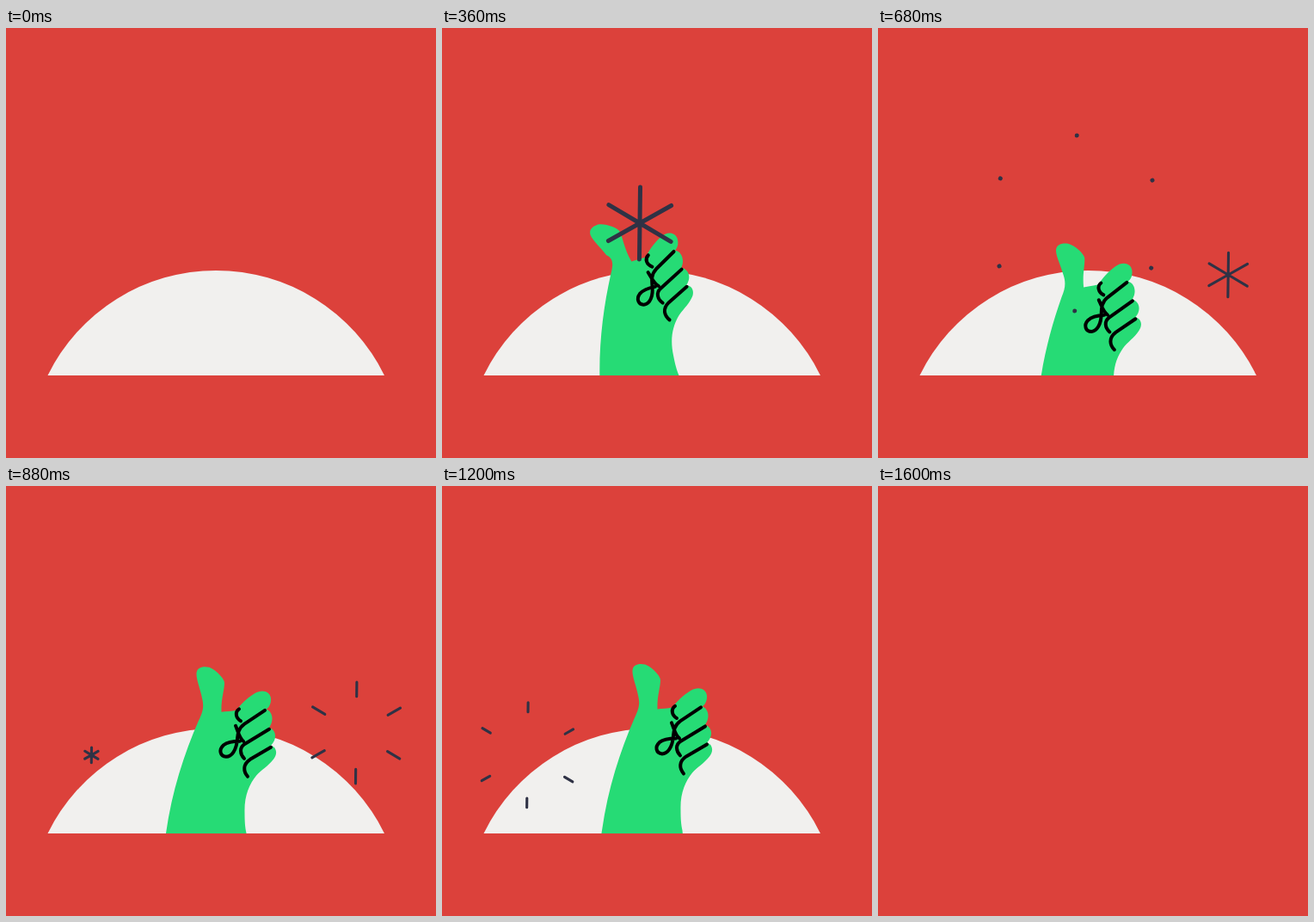
Recreate the animation shown at these times as an HTML page. Size 500x500 px, loop 1960 ms.

```html
<!DOCTYPE html>
<html lang="en">
<head>
<meta charset="utf-8">
<title>Thumbs up</title>
<style>
  html, body { margin: 0; width: 100%; height: 100%; overflow: hidden; background: #dc413b; }
  svg { display: block; width: 100vw; height: 100vh; }
  #lines { fill: none; stroke: #000; stroke-width: 4; stroke-linecap: round; stroke-linejoin: round; }
  .burst { fill: none; stroke: #2f3245; stroke-width: 5; stroke-linecap: round; }
</style>
</head>
<body>
<svg viewBox="0 0 500 500">
  <defs><clipPath id="floor"><path d="M0 0H500V404H0Z"/></clipPath></defs>
  <g id="scene">
    <path fill="#f1f0ee" d="M48.5 404A218 218 0 0 1 440 404Z"/>
    <g clip-path="url(#floor)">
      <g id="hand">
        <path id="skin" fill="#26db75"/>
        <path id="lines" d="M271 259.500C266 263 267 270 273 273.500
          M301 261L277 277C270 282 269.500 289 269 294C268 308 262 315 256 315C249 314.500 247 307 253 301.500C258 297.500 265 297 272 297
          M267 279C270 286 271 293 276 297
          M306 283L278 300C271 304 272 312 277 317
          M308 304L284 318C275 324 276 332 281 338"/>
      </g>
    </g>
    <g id="bursts"></g>
  </g>
</svg>
<script>
const LOOP = 1960, STEP = 40, END = 1600;
const $ = id => document.getElementById(id);
const clamp = v => Math.min(1, Math.max(0, v));
const ease = (t, a, b) => { const p = clamp((t - a) / (b - a)); return p * p * (3 - 2 * p); };

// time, drop, tilt, thumb bend
const poses = [
  [40, 210, -11, -15],
  [360, 0, -11, -15],
  [660, 37, -4.2, 0],
  [860, 0, 0, 0]
];

const bursts = [
  { x: 230, y: 227, r: 102, at: 0 },
  { x: 407.2, y: 287, r: 60, at: 315 },
  { x: 99.4, y: 312.8, r: 61, at: 606 }
];
for (const b of bursts) {
  b.el = document.createElementNS('http://www.w3.org/2000/svg', 'path');
  b.el.setAttribute('class', 'burst');
  b.el.setAttribute('transform', `translate(${b.x} ${b.y}) rotate(.7)`);
  b.el.style.strokeWidth = b.r > 100 ? 5 : 3.1;
  $('bursts').append(b.el);
}

const thumb = [
  [228, 247], [226, 236], [221, 225], [221.5, 218],
  [222, 211], [229, 209.5], [236, 211],
  [243, 213], [254, 224], [254, 229], [254, 238], [250, 247]
];
const arm = 'M177 480C180 455 183 422 186 404C193 355 207 312 224 273C230 261 230 255 ';
const fist = ` 250.500 263C256 262.500 262 262 268 261C272 255 280 247 289 241.500
  C298 236 307 239 308 247C308.500 254 305.500 258 302.500 260
  C310 262 312 273 306 281C314 284 316 294 308 302
  C315 304 316 312 311 318C305 326 297 330 291 337
  C283 347 277 360 277.500 380C277.500 390 278 397 279.500 404C281 420 284 440 287 480Z`;

function skinPath(deg) {
  const a = deg * Math.PI / 180, c = Math.cos(a), s = Math.sin(a);
  const pts = thumb.map(([x, y]) => {
    const dx = x - 238, dy = y - 266;
    return `${238 + dx * c - dy * s} ${266 + dx * s + dy * c}`;
  });
  return `${arm}${pts[0]}C${pts.slice(1).join(' ')}${fist}`;
}

function poseAt(t) {
  let i = 0;
  while (i < poses.length - 2 && t >= poses[i + 1][0]) i++;
  const a = poses[i], b = poses[i + 1], p = ease(t, a[0], b[0]);
  return [1, 2, 3].map(k => a[k] + (b[k] - a[k]) * p);
}

function drawHand(t) {
  const [drop, tilt, bend] = poseAt(t);
  const drift = Math.max(0, t - 860) * 0.0105;
  $('hand').setAttribute('transform', `translate(0 ${drop - drift}) rotate(${tilt} 280 424)`);
  $('hand').setAttribute('visibility', t < 80 ? 'hidden' : 'inherit');
  $('skin').setAttribute('d', skinPath(bend));
}

function drawBurst(b, time) {
  const t = time - b.at;
  let d = '';
  if (t > 171 && t <= 680) {
    const tip = b.r * ease(t, 171, 600), tail = b.r * ease(t, 360, 680);
    for (let i = 0; i < 6; i++) {
      const a = i * Math.PI / 3, x = Math.sin(a), y = -Math.cos(a);
      d += `M${x * tail} ${y * tail}L${x * (tip + .01)} ${y * (tip + .01)}`;
    }
  }
  b.el.setAttribute('d', d);
}

function draw(now) {
  const t = Math.floor((now % LOOP) / STEP) * STEP;
  $('scene').setAttribute('visibility', t < END ? 'visible' : 'hidden');
  drawHand(t);
  bursts.forEach(b => drawBurst(b, t));
}

const start = performance.now();
function frame() {
  draw(performance.now() - start);
  requestAnimationFrame(frame);
}
frame();
</script>
</body>
</html>
```
